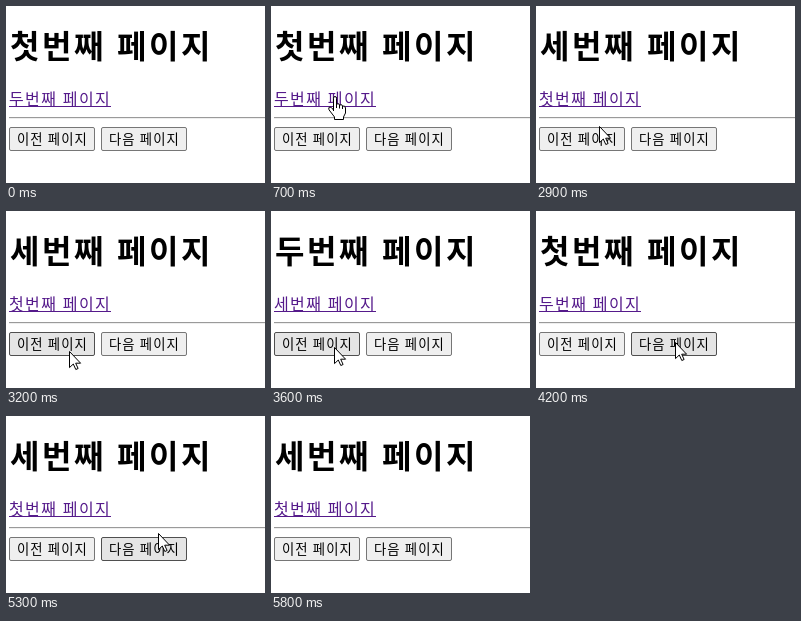
Animation of 259 by 177 pixels, one loop 6.2 s. Source, as an HTML page with a canvas:

```html
<!DOCTYPE html>
<html lang="ko">
<head>
<meta charset="utf-8">
<title>페이지 이동</title>
<style>
html, body { margin: 0; width: 100%; height: 100%; overflow: hidden; background: #fff; }
canvas { display: block; }
</style>
</head>
<body>
<canvas id="stage" width="259" height="177" lang="ko"></canvas>
<script>
const ctx = document.getElementById('stage').getContext('2d');
const LOOP = 6200;
const FONT = '"Noto Sans CJK KR", "Noto Sans CJK JP", "Noto Sans CJK", sans-serif';
const PAGES = ['첫번째 페이지', '두번째 페이지', '세번째 페이지'];
const BUTTONS = [['prev', '이전 페이지', 3], ['next', '다음 페이지', 95]];
const TYPE = {
  title: { weight: 700, size: 32, spacing: 2.5, word: 1.5 },
  link: { weight: 300, size: 16, spacing: 1.35, word: 0.7 },
  button: { weight: 400, size: 13.33, spacing: 1.1, word: 0 }
};
const LOOK = {
  normal: ['#efefef', '#767676'],
  hover: ['#e5e5e5', '#4f4f4f'],
  active: ['#f5f5f5', '#8d8d8d']
};
const ARROW = new Path2D('M.5 .5V16.6L4.3 13L6.8 18.5L9.1 17.5L6.7 12.2H11.6Z');
const HAND = new Path2D('M5.5 15V2.2Q5.5 .5 7 .5Q8.5 .5 8.5 2.2V8Q11.5 7 11.5 9Q14.5 8 14.5 10' +
  'Q17.5 9.5 17.5 12V17L15.5 21V23.5H6.5V21L1 13.8Q0 11 2 11Q3.5 11 5.5 14Z');
const KNUCKLES = new Path2D('M8.5 8V12M11.5 9V12.5M14.5 10V13');

// Each step changes only the listed properties.
const STEPS = [
  [0, { page: 0, cursor: null, x: 0, y: 0, link: '#551a8b', prev: 'normal', next: 'normal' }],
  [200, { cursor: 'arrow', x: 225, y: 28 }],
  [300, { x: 196, y: 33 }],
  [400, { x: 158, y: 41 }],
  [500, { x: 114, y: 52 }],
  [600, { x: 79, y: 63 }],
  [700, { cursor: 'hand', x: 57, y: 90 }],
  [1200, { page: 1 }],
  [1900, { link: '#f00' }],
  [2100, { page: 2, link: '#551a8b' }],
  [2900, { cursor: 'arrow', x: 63, y: 120 }],
  [3000, { y: 126, prev: 'hover' }],
  [3200, { y: 140 }],
  [3300, { prev: 'active' }],
  [3400, { page: 1, prev: 'normal' }],
  [3600, { y: 136, prev: 'hover' }],
  [3700, { prev: 'active' }],
  [3800, { page: 0, prev: 'normal' }],
  [4000, { x: 91, y: 135 }],
  [4100, { x: 122, y: 133, next: 'hover' }],
  [4200, { x: 139, y: 131 }],
  [4500, { page: 1, next: 'normal' }],
  [4800, { next: 'hover' }],
  [4900, { next: 'active' }],
  [5000, { page: 2, next: 'normal' }],
  [5300, { x: 152, y: 117, next: 'hover' }],
  [5400, { x: 177, y: 97, next: 'normal' }],
  [5500, { x: 207, y: 86 }],
  [5600, { x: 234, y: 74 }],
  [5700, { x: 251, y: 64 }],
  [5800, { cursor: null }]
];

function stateAt(t) {
  return Object.assign({}, ...STEPS.filter(s => s[0] <= t).map(s => s[1]));
}

function rect(x, y, w, h, color) {
  ctx.fillStyle = color;
  ctx.fillRect(x, y, w, h);
}

function text(str, x, y, { weight, size, spacing, word }, color = '#000') {
  ctx.font = `${weight} ${size}px ${FONT}`;
  ctx.letterSpacing = `${spacing}px`;
  ctx.wordSpacing = `${word}px`;
  ctx.fillStyle = color;
  ctx.fillText(str, x, y);
}

function drawButton(label, x, look) {
  const [fill, border] = LOOK[look];
  ctx.beginPath();
  ctx.roundRect(x + 0.5, 121.5, 85, 23, 1.5);
  ctx.fillStyle = fill;
  ctx.fill();
  ctx.strokeStyle = border;
  ctx.stroke();
  text(label, x + 8, 138, TYPE.button);
}

function drawCursor({ cursor, x, y }) {
  if (!cursor) return;
  const shape = cursor === 'hand' ? HAND : ARROW;
  ctx.save();
  ctx.translate(x, y);
  ctx.fillStyle = '#fff';
  ctx.strokeStyle = '#000';
  ctx.fill(shape);
  ctx.stroke(shape);
  if (cursor === 'hand') ctx.stroke(KNUCKLES);
  ctx.restore();
}

function draw(t) {
  const s = stateAt(t);
  rect(0, 0, 259, 177, '#fff');
  text(PAGES[s.page], 4, 52, TYPE.title);
  text(PAGES[(s.page + 1) % 3], 3, 99, TYPE.link, s.link);
  rect(3, 100, 102, 1, s.link);
  rect(3, 111, 256, 1, '#9a9a9a');
  rect(3, 112, 256, 1, '#eee');
  for (const [id, label, x] of BUTTONS) drawButton(label, x, s[id]);
  drawCursor(s);
}

const start = performance.now();
function tick() {
  draw((performance.now() - start) % LOOP);
  requestAnimationFrame(tick);
}
tick();
</script>
</body>
</html>
```
